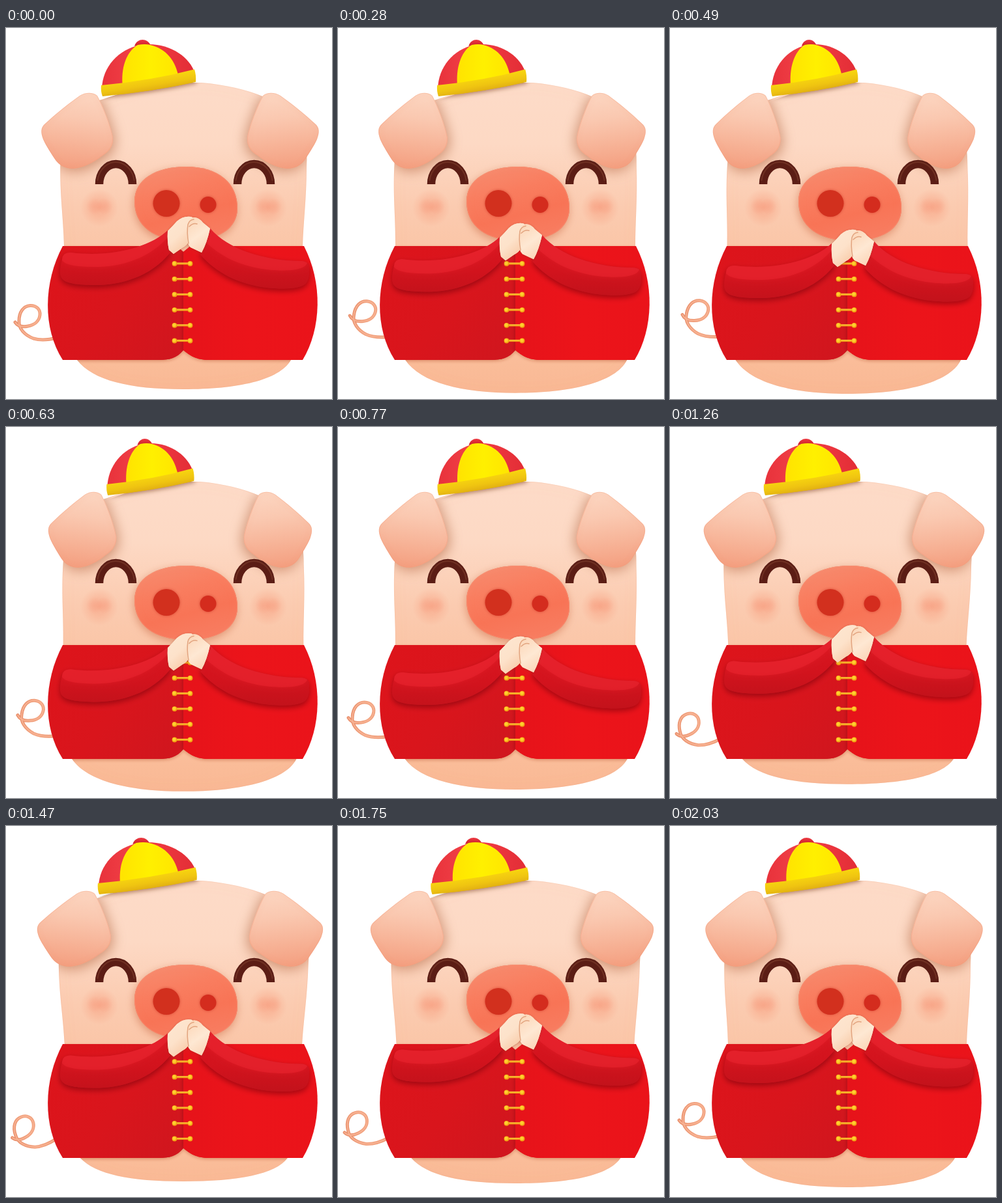
An HTML page with a canvas for the animation above (2100 ms loop, 500x570 px).

```html
<!DOCTYPE html>
<html lang="en">
<head>
<meta charset="utf-8">
<title>Greeting piglet</title>
<style>
html, body { margin: 0; width: 100%; height: 100%; overflow: hidden; background: #fff; }
canvas { display: block; width: 500px; height: 570px; }
</style>
</head>
<body>
<canvas id="stage" width="500" height="570"></canvas>
<script>
const ctx = document.getElementById('stage').getContext('2d');
const STEP = 70, COUNT = 30, MID = 267;

// Pose keys, in steps; each track is a smooth periodic curve through them.
const KEYS = [0, 7, 11, 15, 21, 25, 29];
const TRACKS = {
  width: [1, 0.946, 0.96, 0.986, 1.0305, 1.021, 1],
  base: [555, 562, 557, 553, 546, 549, 555],
  arms: [0, 20, 32, 22, 7.5, -1.5, 0],
  tail: [0, 9, 4, -5.2, -19.6, -13.8, 0]
};

function track(vals, f) {
  const n = KEYS.length - 1;
  const gap = i => KEYS[(i + n) % n + 1] - KEYS[(i + n) % n];
  const slope = i => (vals[(i + n) % n + 1] - vals[(i + n) % n]) / gap(i);
  const tangent = i => (slope(i - 1) * gap(i) + slope(i) * gap(i - 1)) / (gap(i) + gap(i - 1));
  let i = 0;
  while (i < n - 1 && f >= KEYS[i + 1]) i++;
  const h = gap(i), u = (f - KEYS[i]) / h, v = 1 - u;
  return vals[i] * v * v * (1 + 2 * u) + vals[i + 1] * u * u * (3 - 2 * u)
    + h * u * v * (tangent(i) * v - tangent(i + 1) * u);
}

const P = d => new Path2D(d);
const shape = {
  ear: P('M113 104C121 99 133 98 140 104C148 118 160 148 164 168C165 182 158 190 148 196C134 207 118 215 103 216C90 216 81 210 76 203C70 194 62 182 57 171C53 160 53 153 60 147C76 132 95 117 113 104Z'),
  dome: P('M147 93C148 60 172 33 206 26C246 20 281 42 290 70L200 92Z'),
  panel: P('M179 90C176 62 184 37 202 26Q213 24 221 26C246 32 260 50 265 76Z'),
  knob: P('M197 28C201 15 217 15 222 27Q210 24 197 28Z'),
  brim: P('M146 88Q222 81 289 63.5Q292 73 291 83Q222 98 148 105Q145 97 146 88Z'),
  nose: P('M276 213C326 213 355 238 355 277C355 309 325 327 278 327C226 327 197 304 197 266C197 233 229 213 276 213Z'),
  left: P('M87 335H262L272 344V495C262 507 251 510 235 510H87C56 462 57 391 87 335Z'),
  right: P('M272 344L283 335H457C486 391 484 462 455 510H312C291 510 282 503 272 495Z'),
  armL: P('M248 311C222 336 163 353 100 345Q87 344 86 355Q83 366 83 375C83 388 93 392 112 394C163 399 217 388 252 345Q247 328 248 311Z'),
  armR: P('M313 308C340 340 397 358 454 358Q466 359 465 371Q466 383 461 391C454 401 428 402 400 399C357 394 322 376 298 348Q306 327 313 308Z'),
  handL: P('M248 312Q256 304 262 297Q272 288 284 290Q290 292 287 298L281 306L281 327Q278 334 270 338L257 347L250 341Q247 328 248 312Z'),
  handR: P('M279 302Q280 294 288 291Q296 291 302 299L313 308Q308 331 300 345L283 337Q277 331 278 321Z'),
  tail: P('M78 476C66 479 52 480 42 477C29 472 19 462 20 450C20 436 27 427 37 426.5C47 426 53 433 52 441C51 450 44 456 34 458C25 460 18 458 14 452')
};

function ramp(x0, y0, x1, y1, ...colors) {
  const g = ctx.createLinearGradient(x0, y0, x1, y1);
  colors.forEach((c, i) => g.addColorStop(i / (colors.length - 1), c));
  return g;
}

function fill(path, color) {
  ctx.fillStyle = color;
  ctx.fill(path);
}

function layer(draw) {
  ctx.save();
  draw();
  ctx.restore();
}

function shade(color, blur, x = 0, y = 0) {
  ctx.shadowColor = color;
  ctx.shadowBlur = blur;
  ctx.shadowOffsetX = x;
  ctx.shadowOffsetY = y;
}

// Soft tint along the inside of an outline.
function innerGlow(path, line, color, blur) {
  layer(() => {
    ctx.clip(path);
    ctx.lineWidth = 2;
    ctx.strokeStyle = line;
    shade(color, blur);
    ctx.stroke(path);
  });
}

function glow(x, y, r, rgb, alpha) {
  const g = ctx.createRadialGradient(x, y, 0, x, y, r);
  g.addColorStop(0, `rgba(${rgb},${alpha})`);
  g.addColorStop(0.45, `rgba(${rgb},${alpha * 0.65})`);
  g.addColorStop(1, `rgba(${rgb},0)`);
  ctx.fillStyle = g;
  ctx.fillRect(x - r, y - r, 2 * r, 2 * r);
}

function disc(x, y, r, color) {
  ctx.fillStyle = color;
  ctx.beginPath();
  ctx.arc(x, y, r, 0, 7);
  ctx.fill();
}

// The torso tapers: wider on top means narrower below.
function bodyPath(width, base) {
  const path = new Path2D();
  const map = (x, y) => [MID + (x - MID) * (1 + (width - 1) * (305 - y) / 205), y];
  const curve = (...p) => path.bezierCurveTo(
    ...map(p[0], p[1]), ...map(p[2], p[3]), ...map(p[4], p[5]));
  const drop = part => 510 + (base - 510) * part;
  path.moveTo(...map(89, 335));
  curve(88, 290, 82, 255, 83.5, 205);
  curve(85, 150, 105, 122, 150, 109);
  curve(205, 89, 262, 83, 300, 84);
  curve(337, 87, 370, 95, 396, 106);
  curve(440, 123, 466, 150, 461, 215);
  curve(461, 260, 456, 300, 455, 335);
  path.lineTo(...map(450, 420));
  path.lineTo(...map(437, 510));
  path.bezierCurveTo(...map(419, drop(0.7)), 355, base, 272, base);
  path.bezierCurveTo(190, base, ...map(133, drop(0.7)), ...map(109, 510));
  path.lineTo(...map(96, 420));
  path.closePath();
  return path;
}

function mirrored(side, width, draw) {
  layer(() => {
    ctx.translate(MID, 0);
    ctx.scale(side * width, 1);
    ctx.translate(-MID, 0);
    draw();
  });
}

function drawTail(angle) {
  layer(() => {
    ctx.translate(90, 478);
    ctx.rotate(angle * Math.PI / 180);
    ctx.translate(-90, -478);
    ctx.lineCap = 'round';
    ctx.lineWidth = 5;
    ctx.strokeStyle = ramp(14, 0, 75, 0, '#e9906d', '#f3a582', '#ec9874');
    ctx.stroke(shape.tail);
    ctx.lineWidth = 1.6;
    ctx.strokeStyle = '#f8b495';
    ctx.stroke(shape.tail);
  });
}

function drawBody(body) {
  fill(body, ramp(0, 83, 0, 562, '#fddbc8', '#fdd9c4', '#fbcbb0', '#fac3a3', '#fbc19e', '#f9b894'));
  innerGlow(body, 'rgba(240,170,135,.2)', 'rgba(232,150,112,.8)', 24);
}

function drawHat(width, body) {
  layer(() => {
    const s = 1 + 1.52 * (width - 1);
    ctx.translate(256, 0);
    ctx.scale(s, 1);
    ctx.translate(-256, 0);
    layer(() => {
      ctx.clip(body);
      shade('rgba(120,60,30,.6)', 7, 1, 2);
      fill(shape.brim, '#dba410');
    });
    fill(shape.knob, ramp(0, 18, 0, 28, '#ee3a42', '#c91f2a'));
    fill(shape.dome, ramp(147, 0, 290, 0, '#e8323b', '#f03f46', '#ec363e', '#e22d36'));
    fill(shape.panel, ramp(178, 0, 265, 0, '#ffe300', '#fff000', '#ffe500'));
    fill(shape.brim, ramp(216, 75, 220, 101, '#f8d60f', '#efc411', '#dba512'));
  });
}

function drawEar(side, width, body) {
  layer(() => {
    ctx.clip(body);
    mirrored(side, width, () => {
      shade('rgba(175,95,58,.6)', 20, side * 3, 4);
      fill(shape.ear, '#f4b192');
    });
  });
  mirrored(side, width, () => {
    fill(shape.ear, ramp(120, 100, 106, 216, '#fcd5c0', '#fac8b0', '#f7b498', '#f49f80'));
    innerGlow(shape.ear, 'rgba(240,150,115,.3)', 'rgba(235,135,100,.5)', 9);
  });
}

function drawEye(x) {
  const arch = new Path2D();
  arch.ellipse(x, 240, 25.5, 31, 0, Math.PI, 2 * Math.PI);
  ctx.lineWidth = 12.5;
  ctx.strokeStyle = '#5b1d15';
  ctx.stroke(arch);
  const rim = new Path2D();
  rim.ellipse(x, 240, 28.5, 34, 0, Math.PI * 1.05, Math.PI * 1.95);
  ctx.lineWidth = 2;
  ctx.strokeStyle = '#6f3022';
  ctx.stroke(rim);
}

function drawFace(body) {
  for (const x of [143, 402]) {
    glow(x, 276, 29, '246,145,112', 0.45);
    glow(x - 7, 274, 13, '246,135,105', 0.25);
    glow(x + 8, 274, 13, '246,135,105', 0.25);
  }
  drawEye(168.5);
  drawEye(380.5);
  layer(() => {
    ctx.clip(body);
    shade('rgba(200,105,70,.55)', 13, -1, 4);
    fill(shape.nose, '#f27b60');
  });
  fill(shape.nose, ramp(250, 213, 280, 327, '#f78a6d', '#f97d5f', '#f87456', '#f87c60'));
  innerGlow(shape.nose, 'rgba(248,155,125,.4)', 'rgba(250,160,130,.6)', 12);
  layer(() => {
    shade('#d94a35', 4);
    disc(246, 269.5, 20.5, '#d2301e');
    disc(310, 271.5, 12.5, '#d42c1e');
  });
}

function drawCoat(body) {
  layer(() => {
    ctx.clip(body);
    shade('rgba(190,95,60,.5)', 5, 0, 2);
    fill(shape.left, '#d5161d');
    fill(shape.right, '#ea141a');
  });
  fill(shape.left, ramp(80, 350, 272, 500, '#dd141b', '#d9151c', '#d0161e'));
  layer(() => {
    ctx.clip(shape.left);
    shade('rgba(130,5,12,.45)', 6, -1, 0);
    fill(shape.right, '#e8131a');
  });
  fill(shape.right, ramp(272, 0, 478, 0, '#e6131a', '#ec141a', '#ea131a'));
}

function drawButtons() {
  for (let i = 0; i < 6; i++) {
    const y = 362 + i * 23.7;
    ctx.fillStyle = ramp(0, y - 2, 0, y + 2, '#ffd03a', '#ef8f13');
    ctx.fillRect(258, y - 1.6, 25, 3.2);
    for (const x of [258.5, 282.5]) {
      disc(x, y, 3.9, '#f2a415');
      disc(x - 0.5, y - 0.6, 2.7, '#ffd02e');
    }
  }
}

function drawArm(arm, dy) {
  layer(() => {
    const coat = new Path2D(shape.left);
    coat.addPath(shape.right);
    ctx.clip(coat);
    ctx.translate(0, dy);
    shade('rgba(120,0,10,.6)', 9, 0, 4);
    fill(arm, '#c8121c');
  });
  layer(() => {
    ctx.translate(0, dy);
    fill(arm, ramp(0, 325, 0, 400, '#d8151f', '#d2131d', '#c3121b'));
    // Light falls on the upper half of the sleeve.
    ctx.clip(arm);
    ctx.translate(0, -28);
    shade('rgba(236,40,50,.6)', 7);
    fill(arm, 'rgba(236,38,48,.55)');
  });
}

function drawHands(dy) {
  layer(() => {
    ctx.translate(0, dy);
    layer(() => {
      shade('rgba(150,50,30,.4)', 4, 0, 1);
      fill(shape.handL, '#fbdcc0');
      fill(shape.handR, '#fbdcc0');
    });
    fill(shape.handL, ramp(250, 300, 282, 335, '#fde6d0', '#fde2ca', '#f8cba9'));
    fill(shape.handR, ramp(279, 300, 308, 340, '#fcd9bc', '#fee8d3', '#fbd5b8'));
    ctx.lineWidth = 1.5;
    ctx.lineCap = 'round';
    ctx.strokeStyle = '#e2a47f';
    ctx.stroke(P('M280 331Q277 314 279 302Q281 295 288 294M281 305Q287 299 293 301'));
  });
}

function draw(now) {
  const f = Math.floor(now / STEP) % COUNT;
  const width = track(TRACKS.width, f);
  const body = bodyPath(width, track(TRACKS.base, f));
  const dy = track(TRACKS.arms, f);
  ctx.fillStyle = '#fff';
  ctx.fillRect(0, 0, 500, 570);
  drawTail(track(TRACKS.tail, f));
  drawBody(body);
  drawHat(width, body);
  drawEar(1, width, body);
  drawEar(-1, width, body);
  drawFace(body);
  drawCoat(body);
  drawButtons();
  drawArm(shape.armL, dy);
  drawArm(shape.armR, dy);
  drawHands(dy);
}

const start = performance.now();
function loop() {
  draw(performance.now() - start);
  requestAnimationFrame(loop);
}
loop();
</script>
</body>
</html>
```
